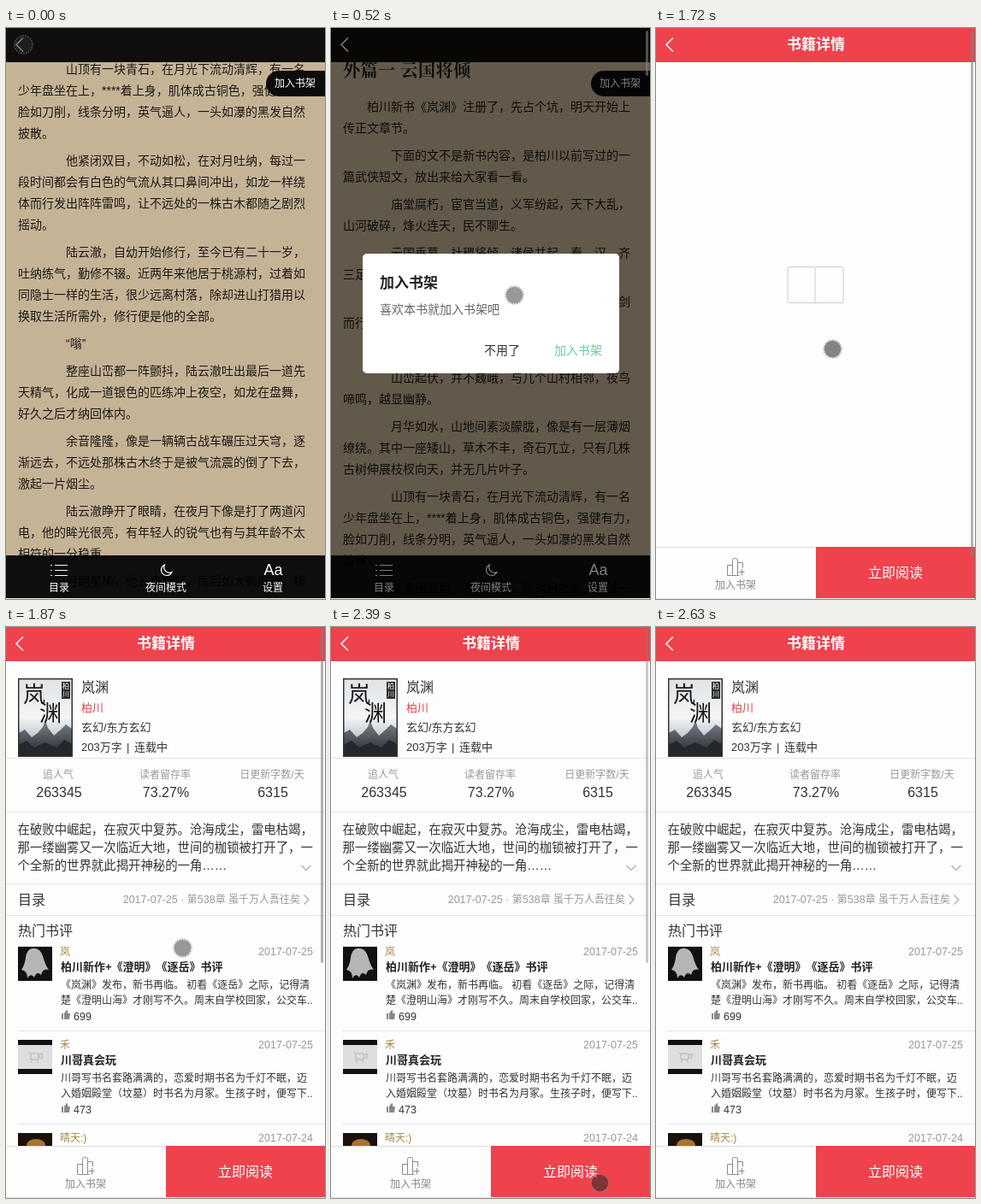
Recreate the animation shown at these times as an HTML page. Size 373 by 668 pixels, loop 2910 ms.

```html
<!DOCTYPE html>
<html lang="zh-CN">
<head>
<meta charset="utf-8">
<title>Reader</title>
<style>
html, body { margin: 0; width: 100%; height: 100%; overflow: hidden; background: #fdfdfd; }
body {
  position: relative;
  font: 12px/20px "Liberation Sans", "Noto Sans CJK SC", "Noto Sans CJK", sans-serif;
  text-spacing-trim: space-all;
  color: #333;
}
#stage { position: absolute; left: 0; top: 0; width: 373px; height: 668px; overflow: hidden; }
.screen, .box, .t, svg { position: absolute; }
.screen { left: 0; top: 0; width: 373px; height: 667px; overflow: hidden; }
.t { white-space: pre; }
.c { transform: translateX(-50%); }
.white { color: #fff; }
.grey { color: #999; }
.s13 { font-size: 13px; }
.s14 { font-size: 14px; }
.s16 { font-size: 16px; }
.s17 { font-size: 17px; font-weight: bold; }
.num { font-size: 12.5px; }
.line { position: absolute; left: 0; right: 0; height: 1px; background: #e4e4e4; }
svg { left: 0; top: 0; fill: none; }

/* reading screen */
#read { background: #c5b396; color: #1c1a17; }
#page { position: absolute; left: 14px; top: 80px; font-size: 14px; line-height: 25px; white-space: nowrap; animation: page 2910ms step-end infinite; }
#page p { margin: 0 0 7px; text-indent: 56px; }
#page p:first-of-type { text-indent: 28px; }
#page h1 {
  position: absolute; left: 0; top: -43px; margin: 0;
  font: 600 20px/26px "Liberation Serif", "Noto Serif CJK SC", "Noto Sans CJK SC", serif;
  letter-spacing: .6px;
}
.bar { position: absolute; left: 0; width: 373px; background: rgba(0,0,0,.92); }
#pill { position: absolute; left: 304px; top: 50px; width: 69px; height: 30px; border-radius: 15px 0 0 15px; background: #0c0b0a; }
#modal { background: rgba(0,0,0,.5); color: #333; animation: modal 2910ms step-end infinite; }
#dialog { position: absolute; left: 37px; top: 264px; width: 300px; height: 140px; border-radius: 5px; background: #fff; }

/* book screen */
#book { background: #fdfdfd; animation: book 2910ms step-end infinite; }
#info { animation: info 2910ms step-end infinite; }
#wait { animation: wait 2910ms step-end infinite; }
.red { background: #ee424c; }
.intro { font-size: 14.4px; line-height: 21px; }
.review { position: absolute; left: 0; width: 373px; height: 109px; }
.review .line { left: 14px; top: 109px; }
.name { color: #a38a4c; }
.head { font-size: 13px; font-weight: bold; color: #222; }
.text { line-height: 18px; }

#thumb { position: absolute; left: 368px; top: 3px; width: 3px; border-radius: 2px; background: rgba(128,128,128,.6); animation: thumb 2910ms step-end infinite; }
#touch { left: -11.5px; top: -11.5px; animation: touch 2910ms step-end infinite; }

@keyframes page { 0% { transform: translateY(-500px) } 4.12%, 100% { transform: none } }
@keyframes modal { 0% { visibility: hidden } 4.12%, 100% { visibility: visible } }
@keyframes book { 0% { visibility: hidden } 59.1%, 100% { visibility: visible } }
@keyframes info { 0% { opacity: 0 } 64.26%, 100% { opacity: 1 } }
@keyframes wait { 0% { opacity: 1 } 64.26%, 100% { opacity: 0 } }
@keyframes thumb {
  0% { height: 53px; opacity: 0 }
  4.12% { height: 53px; opacity: 1 }
  23.02% { height: 53px; opacity: .7 }
  28.17% { height: 53px; opacity: .35 }
  32.3% { height: 53px; opacity: 0 }
  59.1% { height: 616px; opacity: 1 }
  64.26% { height: 390px; opacity: 1 }
  82.13% { height: 390px; opacity: .7 }
  86.25% { height: 390px; opacity: .35 }
  90.37%, 100% { height: 390px; opacity: 0 }
}
@keyframes touch {
  0% { transform: translate(20px, 19px); color: rgba(40,40,40,.57) }
  4.12% { transform: translate(20px, 19px); color: rgba(40,40,40,.48) }
  13.74% { transform: translate(122px, 168px); color: rgba(40,40,40,.48) }
  17.86% { transform: translate(214px, 312px); color: rgba(40,40,40,.48) }
  23.02% { transform: translate(192px, 326px); color: rgba(40,40,40,.48) }
  28.17% { transform: translate(206px, 375px); color: rgba(40,40,40,.48) }
  32.3% { transform: translate(206px, 375px); color: rgba(40,40,40,.57) }
  64.26% { transform: translate(206px, 375px); color: rgba(40,40,40,.48) }
  73.88% { transform: translate(258px, 510px); color: rgba(40,40,40,.48) }
  78% { transform: translate(314px, 650px); color: rgba(40,40,40,.48) }
  82.13% { transform: translate(314px, 650px); color: rgba(40,40,40,.57); opacity: 1 }
  90.37%, 100% { transform: translate(314px, 650px); opacity: 0 }
}
</style>
</head>
<body>
<div id="stage">

<div id="read" class="screen">
  <div id="page">
    <h1>外篇一 云国将倾</h1>
    <p>柏川新书《岚渊》注册了，先占个坑，明天开始上<br>传正文章节。</p>
    <p>下面的文不是新书内容，是柏川以前写过的一<br>篇武侠短文，放出来给大家看一看。</p>
    <p>庙堂腐朽，宦官当道，义军纷起，天下大乱，<br>山河破碎，烽火连天，民不聊生。</p>
    <p>云国垂暮，社稷将倾，诸侯并起，秦、汉、齐<br>三足鼎立，战火不休。</p>
    <p>乱世之中，少年游侠辞别故里，孤身一人负剑<br>而行，不问归期。</p>
    <p>夜色深沉。</p>
    <p>山峦起伏，并不巍峨，与几个山村相邻，夜鸟<br>啼鸣，越显幽静。</p>
    <p>月华如水，山地间素淡朦胧，像是有一层薄烟<br>缭绕。其中一座矮山，草木不丰，奇石兀立，只有几株<br>古树伸展枝杈向天，并无几片叶子。</p>
    <p>山顶有一块青石，在月光下流动清辉，有一名<br>少年盘坐在上，****着上身，肌体成古铜色，强健有力，<br>脸如刀削，线条分明，英气逼人，一头如瀑的黑发自然<br>披散。</p>
    <p>他紧闭双目，不动如松，在对月吐纳，每过一<br>段时间都会有白色的气流从其口鼻间冲出，如龙一样绕<br>体而行发出阵阵雷鸣，让不远处的一株古木都随之剧烈<br>摇动。</p>
    <p>陆云澈，自幼开始修行，至今已有二十一岁，<br>吐纳练气，勤修不辍。近两年来他居于桃源村，过着如<br>同隐士一样的生活，很少远离村落，除却进山打猎用以<br>换取生活所需外，修行便是他的全部。</p>
    <p>“嗡”</p>
    <p>整座山峦都一阵颤抖，陆云澈吐出最后一道先<br>天精气，化成一道银色的匹练冲上夜空，如龙在盘舞，<br>好久之后才纳回体内。</p>
    <p>余音隆隆，像是一辆辆古战车碾压过天穹，逐<br>渐远去，不远处那株古木终于是被气流震的倒了下去，<br>激起一片烟尘。</p>
    <p>陆云澈睁开了眼睛，在夜月下像是打了两道闪<br>电，他的眸光很亮，有年轻人的锐气也有与其年龄不太<br>相符的一分稳重。</p>
    <p>月朗星稀，他长身而起，而后如大鹏展翅，横</p>
  </div>
  <div class="bar" style="top:0;height:40px;background:#100e0c"></div>
  <div class="bar" style="top:617px;height:50px"></div>
  <div id="pill"></div>
  <div class="t white" style="left:314px;top:55px">加入书架</div>
  <svg width="373" height="667" stroke="#fff" stroke-width="1.2">
    <path d="M20 11.5 12 19.5l8 8" stroke-width="1.5"/>
    <path d="M57 628.5h15M57 634.5h15M57 640.5h15M52 628.5h2M52 634.5h2M52 640.5h2"/>
    <path d="M185.5 628a6.5 6.5 0 1 0 8.5 8.5a6.3 6.3 0 0 1-8.5-8.5z"/>
  </svg>
  <div class="t c white" style="left:312.5px;top:624px;font-size:18px">Aa</div>
  <div class="t c white" style="left:62px;top:645px">目录</div>
  <div class="t c white" style="left:187px;top:645px">夜间模式</div>
  <div class="t c white" style="left:312px;top:645px">设置</div>
  <div id="modal" class="screen">
    <div id="dialog"></div>
    <div class="t s17" style="left:57px;top:289px;color:#222">加入书架</div>
    <div class="t s14" style="left:57px;top:319px;color:#666">喜欢本书就加入书架吧</div>
    <div class="t s14" style="left:179px;top:367px">不用了</div>
    <div class="t s14" style="left:261px;top:367px;color:#69cd97">加入书架</div>
  </div>
</div>

<div id="book" class="screen">
  <svg id="wait" width="373" height="667" fill="#e5e5e5" stroke="#ccc">
    <path d="M155.5 279.5H185l1 1 1-1h31q1 0 1 1v40q0 1-1 1h-31l-1 1-1-1h-30q-1 0-1-1v-40q0-1 1.5-1zM186 280.5v41"/>
  </svg>

  <div id="info">
    <svg width="373" height="667">
      <defs>
        <linearGradient id="mist" x1="0" y1="0" x2="0" y2="1">
          <stop offset="0" stop-color="#dfe3e6"/><stop offset=".5" stop-color="#f3f5f6"/>
          <stop offset=".75" stop-color="#c3c8cd"/><stop offset="1" stop-color="#5a6068"/>
        </linearGradient>
        <linearGradient id="hill" x1="0" y1="0" x2="0" y2="1">
          <stop offset="0" stop-color="#7d848c"/><stop offset="1" stop-color="#1f2328"/>
        </linearGradient>
      </defs>
      <path d="M14 60h64v92H14z" fill="url(#mist)"/>
      <path d="M15 124l7-4 8 9 7-5 6-7 3-8 3 9 7 9 8-7 6-6 7 5v33H15z" fill="url(#hill)"/>
      <path d="M15 138l9-5 9 8 13-6 13 6 9-9 9 5v15H15z" fill="#24282d"/>
      <path d="M65 64h10v20H65z" fill="#2b2b2d"/>
      <path d="M14.75 60.75h62.5v90.5h-62.5z" stroke="#333" stroke-width="1.5"/>
      <path d="M345.5 279l5.5 5.5 5.5-5.5M348.5 313.5l5.5 5.5-5.5 5.5" stroke="#aaa" stroke-width="1.2"/>
    </svg>
    <div class="t" style="left:20px;top:69px;font-size:26px;color:#17181a">岚</div>
    <div class="t" style="left:39px;top:91px;font-size:26px;color:#17181a">渊</div>
    <div class="t white" style="left:66px;top:65px;font-size:8px;line-height:9px">柏<br>川</div>

    <div class="t s16" style="left:88px;top:61px">岚渊</div>
    <div class="t s13" style="left:88px;top:85px;color:#ee424c">柏川</div>
    <div class="t s13" style="left:88px;top:108px">玄幻/东方玄幻</div>
    <div class="t s13" style="left:88px;top:131px">203万字</div>
    <div class="t s13" style="left:141px;top:131px">|</div>
    <div class="t s13" style="left:150px;top:131px">连载中</div>
    <div class="line" style="top:153px"></div>

    <div class="t c grey" style="left:61px;top:163px">追人气</div>
    <div class="t c grey" style="left:186px;top:163px">读者留存率</div>
    <div class="t c grey" style="left:311px;top:163px">日更新字数/天</div>
    <div class="t c s16" style="left:62px;top:184px">263345</div>
    <div class="t c s16" style="left:187px;top:184px">73.27%</div>
    <div class="t c s16" style="left:312px;top:184px">6315</div>
    <div class="line" style="top:216px"></div>

    <div class="t intro" style="left:13.5px;top:227px">在破败中崛起，在寂灭中复苏。沧海成尘，雷电枯竭，
那一缕幽雾又一次临近大地，世间的枷锁被打开了，一
个全新的世界就此揭开神秘的一角……</div>
    <div class="line" style="top:300px"></div>
    <div class="t s16" style="left:14px;top:310px">目录</div>
    <div class="t grey" style="right:29px;top:309px"><span class="num">2017-07-25 · </span>第<span class="num">538</span>章 虽千万人吾往矣</div>
    <div class="line" style="top:337px"></div>
    <div class="t s16" style="left:14px;top:346px">热门书评</div>

    <div id="reviews"></div>
    <svg width="373" height="667">
      <path d="M14 374h40v40H14z" fill="#101112"/>
      <path d="M31 376q9-1 12 9 3 11 7 16-7-2-9 6-5-5-8 3-4-6-8 1 0-9-7-10 4-6 5-14 1-10 8-11z" fill="#b4b6b7"/>
      <path d="M14 483h40v40H14z" fill="#111"/>
      <path d="M14 489h40v28H14z" fill="#dedfdc"/>
      <path d="M29 499h9v7h-9zM38 501l4-2v6l-4-2M31 506l-2 4M36 506l2 4M26 497l3 3" stroke="#b4b5b2"/>
      <path d="M14 592h40v40H14z" fill="#1a110b"/>
      <ellipse cx="35" cy="606" rx="11" ry="7" fill="#a8742f"/>
    </svg>
  </div>

  <div class="box red" style="left:0;top:0;width:373px;height:40px"></div>
  <div class="t c s17 white" style="left:187px;top:10px">书籍详情</div>
  <div class="box" style="left:0;top:607px;width:187px;height:60px;background:#fdfdfd"></div>
  <div class="line" style="top:607px;background:#ddd"></div>
  <div class="box red" style="left:187px;top:607px;width:186px;height:60px"></div>
  <svg width="373" height="667" stroke="#8c8c8c">
    <path d="M20 11.5 12 19.5l8 8" stroke="#fff" stroke-width="1.5"/>
    <path d="M89.5 640.5h-6v-12h6M95.5 640.5h-6v-18q0-2 2-2h2q2 0 2 2zM95.5 625.5h6v6M95.5 640.5h2M96.5 636.5h7M100.5 633v7.5"/>
  </svg>
  <div class="t c" style="left:93px;top:642px;color:#888">加入书架</div>
  <div class="t c s16 white" style="left:280px;top:628px">立即阅读</div>
</div>

<div id="thumb"></div>
<svg id="touch" width="23" height="23">
  <circle cx="11.5" cy="11.5" r="9.8" fill="currentColor"/>
  <circle cx="11.5" cy="11.5" r="10.5" stroke="rgba(130,130,130,.45)" stroke-width="1.8" stroke-dasharray="2 1"/>
</svg>
<div class="line" style="top:667px;background:#e8e8e8"></div>
</div>

<script>
const reviews = [
  ["岚", "2017-07-25", "柏川新作+《澄明》《逐岳》书评",
    "《岚渊》发布，新书再临。 初看《逐岳》之际，记得清\n楚《澄明山海》才刚写不久。周末自学校回家，公交车..", 699],
  ["禾", "2017-07-25", "川哥真会玩",
    "川哥写书名套路满满的，恋爱时期书名为千灯不眠，迈\n入婚姻殿堂（坟墓）时书名为月冢。生孩子时，便写下..", 473],
  ["晴天:)", "2017-07-24", "", "", ""]
];
const text = (cls, pos, top, s) => `<div class="t ${cls}" style="${pos};top:${top}px">${s}</div>`;
const thumbUp = '<svg width="90" height="109"><path d="M65 89h2v7h-2zM68 89l3-4q2 0 1 4h3l-1 7h-6z" fill="#888"/></svg>';

document.getElementById("reviews").innerHTML = reviews.map(([name, date, head, body, likes], i) =>
  `<div class="review" style="top:${363 + i * 109}px">` +
  text("name", "left:63px", 7, name) +
  text("num grey", "right:14px", 7, date) +
  text("head", "left:64px", 25, head) +
  text("text", "left:64px", 47, body) +
  thumbUp +
  text("num", "left:79px", 83, likes) +
  '<div class="line"></div></div>').join("");
</script>
</body>
</html>
```
